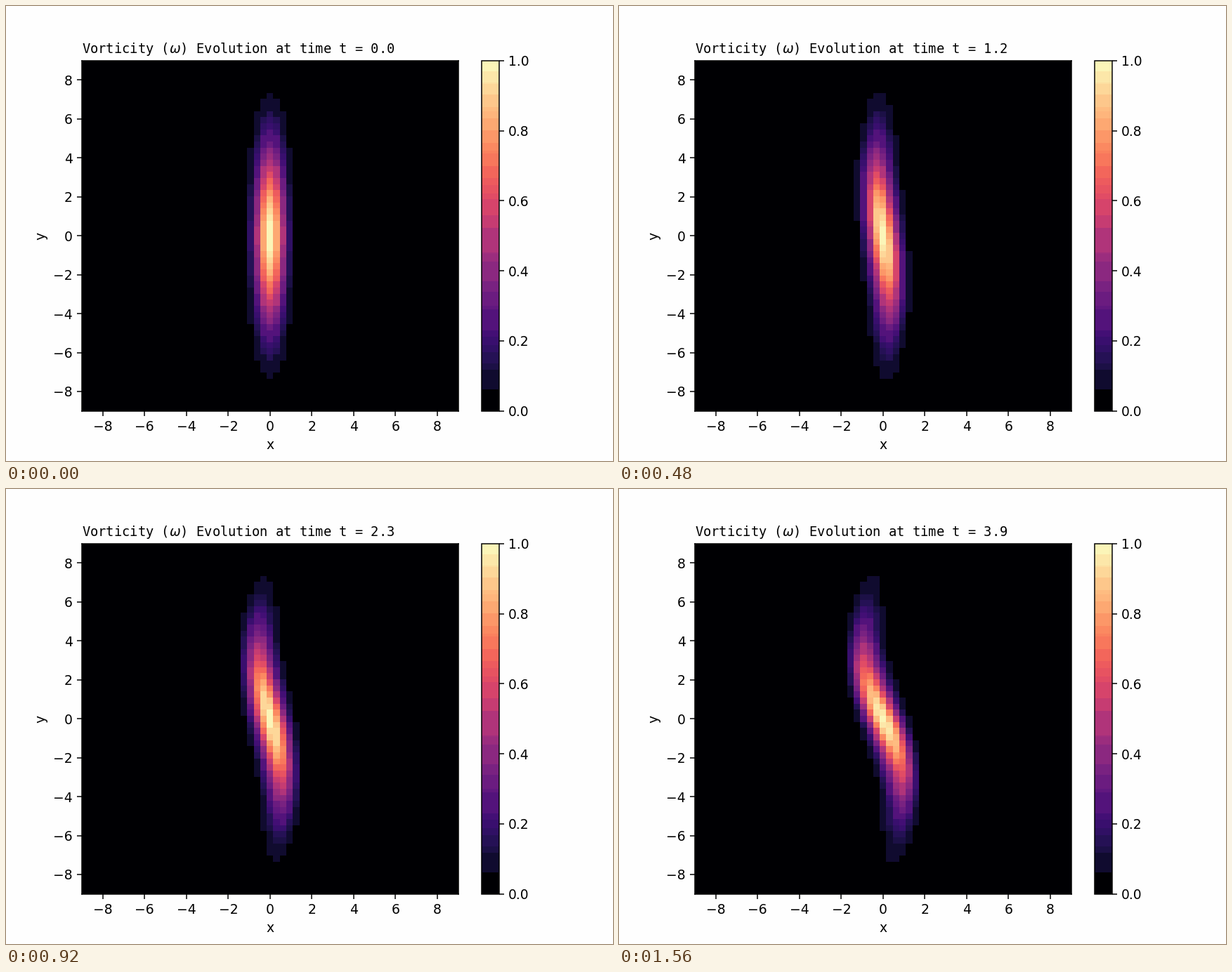
Recreate the animation shown at these times as a matplotlib script. Size 864 by 648 pixels, loop 1.6 s.

```python
import numpy as np
import matplotlib.pyplot as plt
from matplotlib.animation import FuncAnimation
from matplotlib.colors import ListedColormap

N, SIDE = 64, 20.0
FRAMES, DT, SUBSTEPS = 40, 0.1, 2
VISCOSITY = 0.001
PAPER = "#fefefe"

plt.rcParams["font.family"] = "DejaVu Sans"

grid = np.linspace(-SIDE / 2, SIDE / 2, N, endpoint=False)
X, Y = np.meshgrid(grid, grid)
k = 2 * np.pi * np.fft.fftfreq(N, SIDE / N)
KX, KY = np.meshgrid(k, k)
K2 = KX**2 + KY**2
K2_SAFE = np.where(K2 == 0, 1, K2)


def real(spectrum):
    return np.fft.ifft2(spectrum).real


def rate(w):
    """Vorticity equation: advection by the stream function plus diffusion."""
    wh = np.fft.fft2(w)
    psi = -wh / K2_SAFE
    advect = (real(1j * KX * psi) * real(1j * KY * wh)
              - real(1j * KY * psi) * real(1j * KX * wh))
    return -advect - VISCOSITY * real(K2 * wh)


def rk4(w, h):
    a = rate(w)
    b = rate(w + h / 2 * a)
    c = rate(w + h / 2 * b)
    d = rate(w + h * c)
    return w + h / 6 * (a + 2 * b + 2 * c + d)


def solve():
    w = np.exp(-2 * X**2 - Y**2 / 20)
    fields = [w]
    for _ in range(FRAMES - 1):
        for _ in range(SUBSTEPS):
            w = rk4(w, DT / SUBSTEPS)
        fields.append(w)
    return fields


def banded_magma():
    """Magma with coarse colour steps: 3 bits red, 4 green, 3 blue."""
    rgb = (plt.get_cmap("magma")(np.arange(256))[:, :3] * 255).astype(int)
    bins = rgb // [32, 16, 32]
    _, group = np.unique(bins, axis=0, return_inverse=True)
    group = group.ravel()
    means = np.array([rgb[group == g].mean(axis=0) for g in range(group.max() + 1)])
    means[group[0]] = rgb[0]
    return ListedColormap(np.floor(means)[group] / 255)


fields = solve()
fig, ax = plt.subplots(figsize=(6.4, 4.8), dpi=135, facecolor=PAPER)
mesh = ax.pcolormesh(X, Y, fields[0], cmap=banded_magma(), vmin=0, vmax=1,
                     shading="nearest")
fig.colorbar(mesh, ax=ax)
ax.set(xlim=(-9, 9), ylim=(-9, 9), xlabel="x", ylabel="y")
title = ax.set_title("", loc="left", fontsize=10, family="DejaVu Sans Mono")


def update(i):
    mesh.set_array(fields[i])
    title.set_text(rf"Vorticity ($\omega$) Evolution at time t = {i * DT:.1f}")
    return mesh, title


anim = FuncAnimation(fig, update, frames=FRAMES, interval=40, repeat=True,
                     repeat_delay=0)
plt.show()
```
